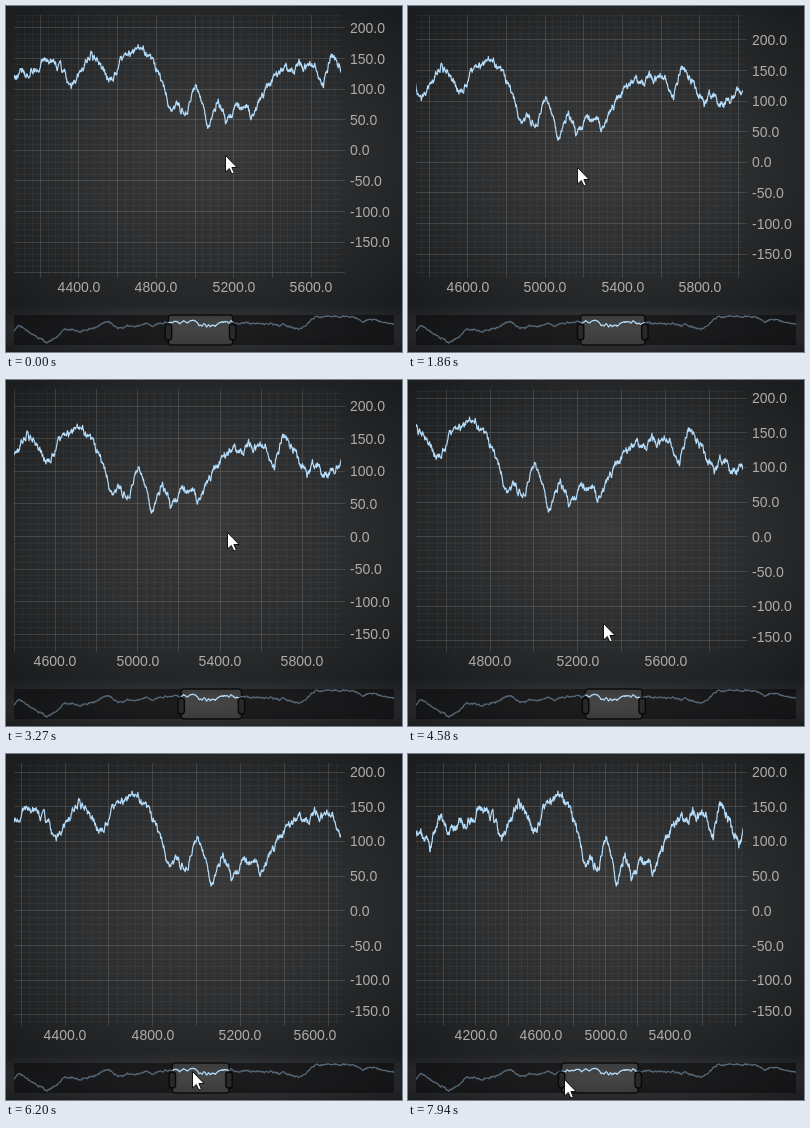
Animation of 396x346 px, one loop 8 s. Source, as an HTML page with a canvas:

```html
<!DOCTYPE html>
<html lang="en">
<head>
<meta charset="utf-8">
<title>Chart with range selector</title>
<style>
html, body { margin: 0; width: 100%; height: 100%; overflow: hidden; background: #1c1d1e; }
canvas { display: block; }
</style>
</head>
<body>
<canvas id="stage" width="396" height="346"></canvas>
<script>
const ctx = document.getElementById('stage').getContext('2d');
const LOOP = 8000, L = 8, R = 335, T = 9, B = 270;
const OV = { x: 8, y: 309, w: 380, h: 30 };
const SPAN = 10000, STEP = 2;

// Turning points of the series: position, value
const knots = [
  0, -36, 158, 77, 868, -262, 1370, 0, 1760, -50, 2530, 130, 2740, 45, 3353, 71,
  3495, 118, 3522, 92, 3568, 90, 3650, 50, 3774, 96, 3851, 122, 3915, 83, 3970, 138,
  4002, 123, 4121, 127, 4258, 153, 4322, 123, 4359, 99, 4464, 161, 4487, 143, 4578, 112,
  4615, 148, 4711, 170, 4765, 157, 4873, 71, 4965, 70, 5006, 109, 5065, 34, 5120, 81,
  5161, 44, 5225, 74, 5300, 55, 5420, 124, 5614, 145, 5662, 108, 5701, 151, 5760, 129,
  5824, 90, 5847, 115, 5925, 93, 6008, 122, 6370, 96, 7080, 75, 7500, -15, 7950, 225,
  8950, 228, 9260, 135, 9470, 190, SPAN, 80
];

let seed = 71;
function rnd() {
  seed = (seed * 16807) % 2147483647;
  return seed / 2147483647 * 2 - 1;
}

const series = [];
for (let u = 0, k = 0, fine = 0, slow = 0; u <= SPAN; u += STEP) {
  while (k < knots.length - 4 && u > knots[k + 2]) k += 2;
  const p = (u - knots[k]) / (knots[k + 2] - knots[k]);
  fine = fine * 0.83 + rnd() * 5;
  slow = slow * 0.98 + rnd() * 4.5;
  const outer = u < 3300 || u > 6060;
  series.push(knots[k + 1] + (knots[k + 3] - knots[k + 1]) * p + fine + (outer ? slow : 0));
}

// x, y: pointer; l, r: visible range; z: height of zero; s: pixels per unit
const start = { x: 219, y: 149, l: 4064, r: 5755, z: 144.3, s: 0.612 };

const WHEEL = 1.0319;
const acts = {
  pan(s, dx, dy) {
    const du = dx * (s.r - s.l) / (R - L);
    s.l -= du;
    s.r -= du;
    s.z += dy;
  },
  slide(s, dx) {
    s.l += dx * SPAN / OV.w;
    s.r += dx * SPAN / OV.w;
  },
  size(s, dx) { s.l += dx * SPAN / OV.w; },
  move() {}
};

function zoom(s, f) {
  const u = s.l + (s.x - L) * (s.r - s.l) / (R - L);
  s.l = u - (u - s.l) / f;
  s.r = u + (s.r - u) / f;
  s.z = s.y + (s.z - s.y) * f;
  s.s *= f;
}

// begin, end, action, pointer goal or zoom factor
const moves = [
  [150, 210, 'move', 220.4, 149],
  [580, 1350, 'pan', 187, 157],
  [1410, 1860, 'pan', 168.6, 161],
  [2070, 2310, 'move', 232, 151],
  [2460, 2580, 'move', 221, 152],
  [2730, 3270, 'zoom', WHEEL ** 2],
  [3540, 3690, 'zoom', WHEEL],
  [3910, 4150, 'zoom', WHEEL],
  [4340, 4580, 'move', 195, 243],
  [4670, 5120, 'move', 197, 324],
  [5210, 5660, 'slide', 155, 315],
  [5720, 5930, 'slide', 175, 316],
  [6020, 6320, 'slide', 193, 317],
  [6530, 7160, 'move', 176, 320],
  [7220, 7310, 'size', 173, 321],
  [7370, 7940, 'size', 156, 325]
];

function stateAt(t) {
  const s = { ...start };
  for (const [a, b, act, x, y] of moves) {
    if (t < a) break;
    const n = Math.round((b - a) / 70) + 1;
    const p = t >= b ? 1 : (Math.floor((t - a) / (b - a) * (n - 1)) + 1) / n;
    if (act === 'zoom') {
      zoom(s, 1 + (x - 1) * p);
      continue;
    }
    const dx = (x - s.x) * p, dy = (y - s.y) * p;
    acts[act](s, dx, dy);
    s.x += dx;
    s.y += dy;
  }
  return s;
}

function glow(cx, cy, rx, ry, x, y, w, h) {
  ctx.save();
  ctx.beginPath();
  ctx.rect(x, y, w, h);
  ctx.clip();
  ctx.translate(cx, cy);
  ctx.scale(rx, ry);
  const g = ctx.createRadialGradient(0, 0, 0, 0, 0, 1);
  g.addColorStop(0, '#3a3a3b');
  g.addColorStop(0.5, '#2d2e2f');
  g.addColorStop(1, '#1c1d1e');
  ctx.fillStyle = g;
  ctx.fillRect(-3, -3, 6, 6);
  ctx.restore();
}

function rule(x1, y1, x2, y2, alpha) {
  ctx.strokeStyle = `rgba(255,255,255,${alpha})`;
  ctx.beginPath();
  ctx.moveTo(x1, y1);
  ctx.lineTo(x2, y2);
  ctx.stroke();
}

const crisp = v => Math.floor(v) + 0.5;

function plot(from, to, stride, px, py) {
  ctx.beginPath();
  const end = Math.min(series.length - 1, Math.ceil(to / STEP));
  for (let i = Math.max(0, Math.floor(from / STEP)); i <= end; i += stride) {
    ctx.lineTo(px(i * STEP), py(series[i]));
  }
  ctx.lineWidth = 1.2;
  ctx.lineJoin = 'round';
  ctx.strokeStyle = '#b4dcfb';
  ctx.stroke();
}

function drawChart(s) {
  const k = (R - L) / (s.r - s.l);
  const px = u => L + (u - s.l) * k;
  const py = v => s.z - v * s.s;
  ctx.lineWidth = 1;
  ctx.font = '14px "Liberation Sans", Arial, sans-serif';
  ctx.fillStyle = '#adadad';

  for (let u = Math.ceil(s.l / 40) * 40; u <= s.r; u += 40) {
    const major = u % 200 === 0, x = crisp(px(u));
    rule(x, T, x, major ? B + 2 : B, major ? 0.13 : 0.04);
  }
  for (let v = Math.ceil((s.z - B) / s.s / 10) * 10; py(v) >= T; v += 10) {
    const major = v % 50 === 0, y = crisp(py(v));
    rule(L, y, major ? R + 4 : R, y, major ? 0.13 : 0.04);
    if (major && v >= -150) {
      const mid = Math.max(17, Math.min(257, py(v)));
      ctx.textAlign = 'left';
      ctx.fillText((v || 0).toFixed(1), 344, Math.round(mid + 5));
    }
  }

  ctx.textAlign = 'center';
  let last = -99;
  for (let u = Math.ceil(s.l / 200) * 200 + 200; u <= s.r; u += 400) {
    const x = Math.min(309, px(u));
    if (x - last > 50) ctx.fillText(u.toFixed(1), Math.round(x), 286);
    last = x;
  }

  ctx.save();
  ctx.beginPath();
  ctx.rect(L, T, R - L, B - T);
  ctx.clip();
  plot(s.l, s.r, 1, px, py);
  ctx.restore();
}

function box(x, y, w, h, r, fill, line) {
  ctx.beginPath();
  ctx.roundRect(x, y, w, h, r);
  ctx.fillStyle = fill;
  ctx.fill();
  ctx.strokeStyle = line;
  ctx.lineWidth = 1.4;
  ctx.stroke();
}

function drawOverview(s) {
  const px = u => OV.x + u * OV.w / SPAN;
  const a = px(s.l), b = px(s.r);
  box(a, OV.y, b - a, OV.h, 3, 'rgba(255,255,255,.06)', '#0c0c0d');
  ctx.save();
  ctx.beginPath();
  ctx.rect(OV.x, OV.y, OV.w, OV.h);
  ctx.clip();
  plot(0, SPAN, 5, px, v => 323.1 - v * 0.053);
  ctx.restore();
  ctx.fillStyle = 'rgba(8,9,10,.55)';
  ctx.fillRect(OV.x, OV.y, a - OV.x, OV.h);
  ctx.fillRect(b, OV.y, OV.x + OV.w - b, OV.h);
  for (const x of [a, b]) box(x - 3.2, 318, 6.4, 16, 3, '#29292a', '#080809');
}

const arrow = new Path2D('M0 0V16.5L3.8 13L6.3 18.5L8.8 17.4L6.4 12H11.6Z');

function drawPointer(x, y) {
  ctx.save();
  ctx.translate(Math.round(x) + 0.5, Math.round(y) + 0.5);
  ctx.fillStyle = '#fff';
  ctx.fill(arrow);
  ctx.strokeStyle = '#111';
  ctx.lineWidth = 1;
  ctx.stroke(arrow);
  ctx.restore();
}

function draw(t) {
  const s = stateAt(t);
  glow(198, 150, 265, 200, 0, 0, 396, 299);
  glow(198, 323, 265, 33, 0, 299, 396, 47);
  drawChart(s);
  drawOverview(s);
  drawPointer(s.x, s.y);
}

const t0 = performance.now();
function tick() {
  draw((performance.now() - t0) % LOOP);
  requestAnimationFrame(tick);
}
tick();
</script>
</body>
</html>
```
